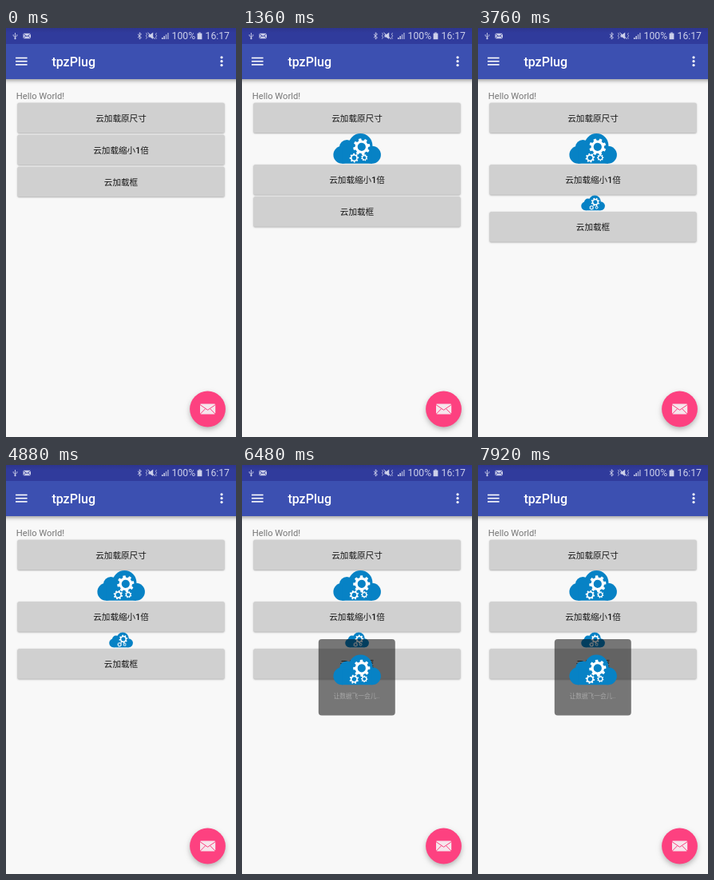
An HTML page with a canvas for the animation above (8000 ms loop, 288x512 px).

```html
<!DOCTYPE html>
<html lang="zh">
<head>
<meta charset="utf-8">
<title>tpzPlug</title>
<style>
html, body { margin: 0; width: 100%; height: 100%; overflow: hidden; background: #f8f8f8; }
canvas { display: block; width: 288px; height: 512px; }
</style>
</head>
<body>
<canvas id="stage" width="288" height="512"></canvas>
<script>
const ctx = document.getElementById('stage').getContext('2d');
const LOOP = 8000, STEP = 80, TAU = Math.PI * 2;
const TAP = [880, 3040, 5360];
const SHOW = [960, 3120, 5440];
const SANS = "Roboto, 'Noto Sans CJK SC', 'Noto Sans CJK', sans-serif";
const STATUS = '#cdd0ea', STATUS_BG = '#303b9c', PINK = '#fd4180';

const clamp = v => Math.max(0, Math.min(1, v));

function rect(x, y, w, h, color) {
  ctx.fillStyle = color;
  ctx.fillRect(x, y, w, h);
}

function rounded(x, y, w, h, r) {
  ctx.beginPath();
  ctx.roundRect(x, y, w, h, r);
}

function disc(x, y, r, color) {
  ctx.fillStyle = color;
  ctx.beginPath();
  ctx.arc(x, y, r, 0, TAU);
  ctx.fill();
}

function poly(points, close) {
  ctx.beginPath();
  points.forEach(([x, y]) => ctx.lineTo(x, y));
  if (close) ctx.closePath();
}

function line(color, width, ...points) {
  ctx.strokeStyle = color;
  ctx.lineWidth = width;
  poly(points);
  ctx.stroke();
}

function text(str, x, y, size, color, weight = 400) {
  ctx.font = `${weight} ${size}px ${SANS}`;
  ctx.fillStyle = color;
  ctx.fillText(str, x, y);
}

function shadow(color, blur, dy) {
  ctx.shadowColor = color;
  ctx.shadowBlur = blur;
  ctx.shadowOffsetY = dy;
}

function envelope(x, y, w, h, paper, ink, width) {
  rounded(x, y, w, h, w / 14);
  ctx.fillStyle = paper;
  ctx.fill();
  const mx = x + w / 2, my = y + h * 0.6;
  line(ink, width, [x, y + h * 0.08], [mx, my], [x + w, y + h * 0.08]);
  line(ink, width, [x, y + h], [x + w * 0.36, y + h * 0.45]);
  line(ink, width, [x + w, y + h], [x + w * 0.64, y + h * 0.45]);
}

function statusBar() {
  const g = ctx.createLinearGradient(0, 0, 0, 20);
  g.addColorStop(0, '#2d358f');
  g.addColorStop(0.3, STATUS_BG);
  rect(0, 0, 288, 20, g);

  // USB
  line(STATUS, 0.9, [11.5, 6], [11.5, 13.5]);
  line(STATUS, 0.8, [9.2, 8], [9.2, 10], [11.5, 11.5], [13.8, 10], [13.8, 8]);
  disc(11.5, 13.2, 1.1, STATUS);
  envelope(21.5, 6.7, 9.5, 6.6, STATUS, STATUS_BG, 0.9);

  // Bluetooth
  line(STATUS, 0.9, [164.9, 7.8], [169.5, 12], [167.2, 14], [167.2, 5.8], [169.5, 7.8], [164.9, 12]);

  // Muted speaker with vibration marks
  ctx.fillStyle = STATUS;
  poly([[178.5, 8.2], [180.5, 8.2], [184.2, 5.6], [184.2, 14], [180.5, 11.6], [178.5, 11.6]], true);
  ctx.fill();
  line(STATUS, 1, [177.5, 5.8], [186.8, 13.8]);
  line(STATUS, 0.8, [175.4, 6], [176.6, 7.8], [175.4, 9.8], [176.6, 11.8], [175.4, 13.6]);
  line(STATUS, 0.8, [188.6, 6], [187.4, 7.8], [188.6, 9.8], [187.4, 11.8], [188.6, 13.6]);

  for (let i = 0; i < 4; i++) {
    const h = 2 + i * 2;
    rect(195 + i * 2.4, 14 - h, 1.5, h, i < 2 ? STATUS : '#9aa0d0');
  }
  text('100%', 207.6, 14, 12.2, STATUS);
  rect(239.6, 6.6, 5.8, 7.6, STATUS);
  rect(241.2, 5.5, 2.6, 1.2, STATUS);
  text('16:17', 249.6, 14, 12.2, STATUS);
}

function toolbar() {
  ctx.save();
  shadow('rgba(0,0,0,.36)', 4.5, 1.6);
  rect(-6, 10, 300, 54, '#3c50b1');
  ctx.restore();
  for (let i = 0; i < 3; i++) {
    rect(12, 36.7 + i * 4.2, 14.6, 1.6, '#fff');
    disc(270, 36.8 + i * 4.9, 1.6, '#fff');
  }
  text('tpzPlug', 57.4, 48, 16, '#fff', 500);
}

// Latin digits are medium, CJK glyphs regular
function label(str, cx, y) {
  const runs = str.split(/(\d)/).map(s => {
    const weight = /\d/.test(s) ? 500 : 400;
    ctx.font = `${weight} 10.6px ${SANS}`;
    return { s, weight, w: ctx.measureText(s).width };
  });
  let x = cx - runs.reduce((sum, r) => sum + r.w, 0) / 2;
  for (const r of runs) {
    text(r.s, x, y, 10.6, '#151515', r.weight);
    x += r.w;
  }
}

function button(str, y, age) {
  const shape = () => rounded(14.5, y, 259, 37.6, 1.6);
  ctx.save();
  shadow('rgba(0,0,0,.32)', 2, 0.6);
  shape();
  ctx.fillStyle = '#d0d0d0';
  ctx.fill();
  ctx.restore();
  if (age >= 0 && age < 480) {
    ctx.save();
    shape();
    ctx.clip();
    const fade = 1 - clamp((age - 120) / 360);
    disc(172, y + 19, 20 + 60 * clamp(age / 320), `rgba(0,0,0,${0.08 * fade})`);
    ctx.restore();
  }
  label(str, 144, y + 22.9);
}

function gear(x, y, r, teeth, angle) {
  ctx.save();
  ctx.translate(x, y);
  ctx.rotate(angle);
  ctx.fillStyle = '#fff';
  ctx.beginPath();
  const pitch = TAU / teeth;
  for (let i = 0; i < teeth; i++) {
    const a = i * pitch;
    ctx.arc(0, 0, r, a - pitch * 0.2, a + pitch * 0.2);
    ctx.arc(0, 0, r * 0.77, a + pitch * 0.3, a + pitch * 0.7);
  }
  ctx.closePath();
  ctx.arc(0, 0, r * 0.48, 0, TAU, true);
  ctx.fill();
  ctx.restore();
}

function cloud(x, y, scale, t) {
  const blue = '#0782c5', spin = t / 4000 * TAU;
  ctx.save();
  ctx.translate(x, y);
  ctx.scale(scale, scale);
  disc(34, 15, 15, blue);
  disc(17, 17.5, 9.5, blue);
  disc(11, 26.7, 11, blue);
  disc(48.5, 26.7, 11, blue);
  rect(11, 18, 37.5, 19.7, blue);
  gear(35.4, 16.8, 10.6, 8, spin);
  gear(26, 30.6, 5.8, 8, -spin * 1.5);
  gear(38.8, 30.3, 4.2, 8, -spin * 2);
  ctx.restore();
}

function dialog(t) {
  ctx.save();
  ctx.globalAlpha = clamp((t - SHOW[2] + STEP) / 160);
  rounded(95.8, 218, 96, 95.6, 4);
  ctx.fillStyle = 'rgba(0,0,0,.52)';
  ctx.fill();
  cloud(114.4, 237.5, 1, t);
  text('让数据飞一会儿..', 114.5, 291.5, 7.7, '#a8a8a8');
  ctx.restore();
}

function fab() {
  ctx.save();
  shadow('rgba(0,0,0,.27)', 6, 3);
  disc(252.5, 477, 22.4, PINK);
  ctx.restore();
  envelope(243, 470.6, 19.2, 12.8, '#f6e6ec', PINK, 1);
}

function draw(t) {
  rect(0, 0, 288, 512, '#f8f8f8');
  toolbar();
  statusBar();
  text('Hello World!', 12.8, 89, 11.2, '#757575');

  const big = t >= SHOW[0], small = t >= SHOW[1];
  const y2 = big ? 171.2 : 133.7;
  const y3 = y2 + (small ? 59 : 40);
  button('云加载原尺寸', 93.7, t - TAP[0]);
  if (big) cloud(114.4, 132, 1, t);
  button('云加载缩小1倍', y2, t - TAP[1]);
  if (small) cloud(129.2, 209.5, 0.5, t);
  button('云加载框', y3, t - TAP[2]);
  fab();
  if (t >= SHOW[2]) dialog(t);
}

const start = performance.now();
function tick() {
  const t = (performance.now() - start) % LOOP;
  draw(Math.floor(t / STEP) * STEP);
  requestAnimationFrame(tick);
}
tick();
</script>
</body>
</html>
```
